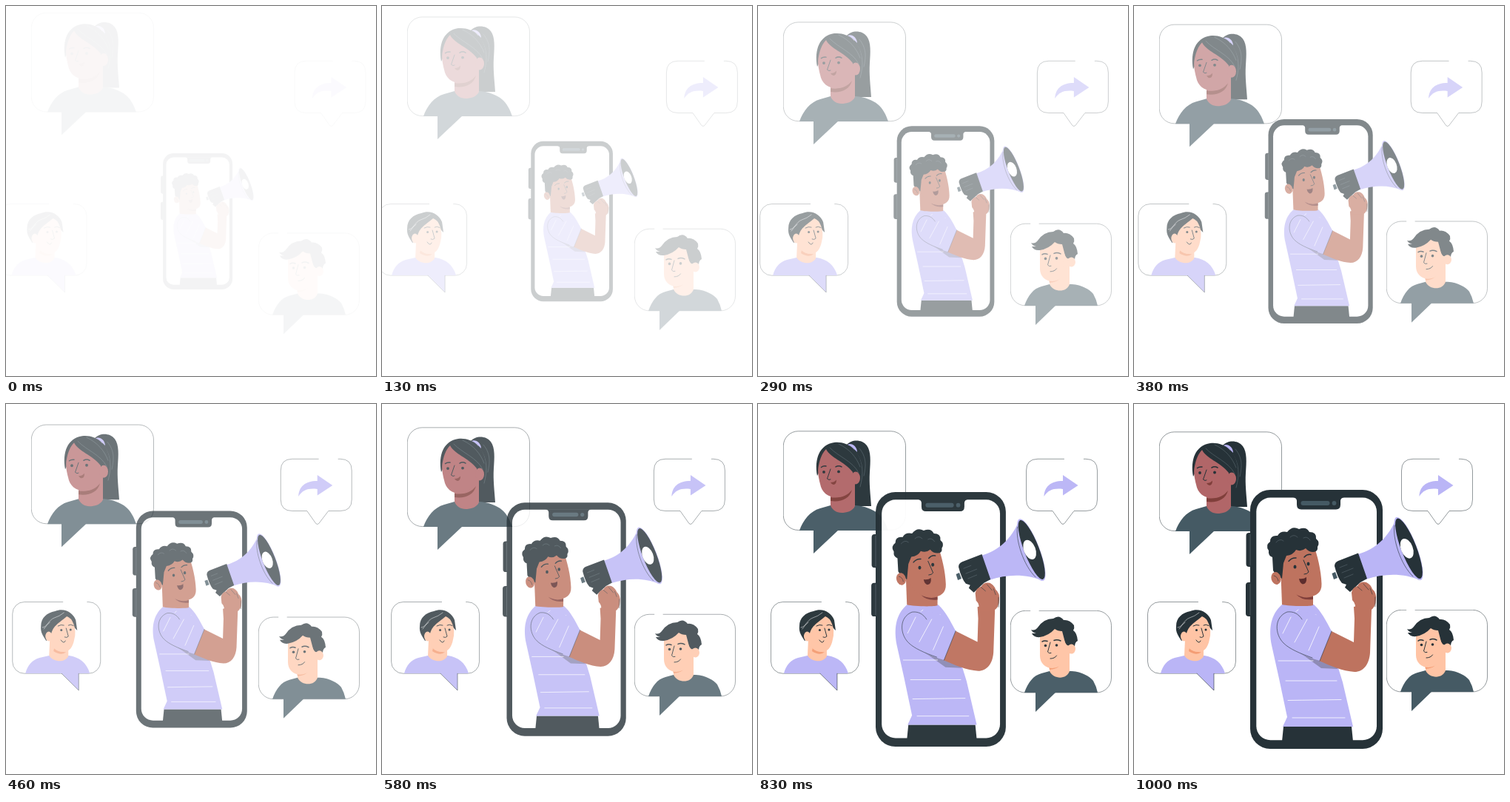
These frames come from a looping animation (500x500 px, 1.04 s). An HTML page:

```html
<!DOCTYPE html>
<html lang="en">
<head>
<meta charset="utf-8">
<title>Announcement</title>
<style>
  html, body { margin: 0; width: 100%; height: 100%; overflow: hidden; background: #fff; }
  svg { display: block; width: 100vw; height: 100vh; }
  .dark { fill: #263238; }
  .slate { fill: #455a64; }
  .lilac { fill: #bab5f6; }
  .brown { fill: #be735f; }
  .rose { fill: #b16668; }
  .peach { fill: #ffc4a5; }
  .white { fill: #fff; }
  .shade { fill: #803f3b; }
  .orange { fill: #f49d74; }
  .box { fill: #fff; stroke: #263238; stroke-width: .5; }
  .ink, .stripe, .strand { fill: none; stroke-linecap: round; stroke-linejoin: round; }
  .ink { stroke: #263238; stroke-width: 1; }
  .brow { stroke-width: 1.5; }
  .thin { stroke-width: .6; }
  .stripe { stroke: #fff; stroke-width: .8; }
  .strand { stroke: #65747b; stroke-width: .5; }
</style>
</head>
<body>
<svg viewBox="0 0 500 500" xmlns="http://www.w3.org/2000/svg">

  <g id="woman">
    <rect class="box" x="34.3" y="37.800" width="165.2" height="133.7" rx="20"/>
    <path class="dark" d="M120 56C126 49 140 48 147 57C153 65 152 79 151 93C150 109 152 123 153 139H131L130 62Z"/>
    <path class="strand" d="M137 61C147 73 146 85 143 98M133 67C142 80 143 95 138 113"/>
    <path class="slate" d="M56 172C61 158 70 146 84 142L98 138H132C144 139 155 143 162 149C169 155 173 163 176 172H108L75 203V172Z"/>
    <path class="rose" d="M98 118L131 105V139C128 146 119 148 113 148C106 148 100 144 98 138Z"/>
    <path class="shade" d="M98 127C111 129 121 125 127 117C124 129 112 134 98 132Z"/>
    <path class="dark" d="M80 98C76 75 83 56 103 53C122 51 136 64 139 80C142 93 139 105 133 109L122 104L90 78Z"/>
    <path class="rose" d="M82 84C84 74 87 67 92 62C98 74 116 78 128 93V109C125 121 116 127 106 127C94 127 86 120 84 109C82 101 80 92 82 84Z"/>
    <ellipse class="rose" cx="132" cy="101" rx="6" ry="8.500"/>
    <path class="strand" d="M97 60C108 72 128 78 136 94M109 55C124 62 133 73 138 86"/>
    <path class="lilac" d="M121 56C126 53 134 58 134 66C130 62 126 58 121 56Z"/>
    <circle class="dark" cx="89" cy="93" r="1.900"/>
    <circle class="dark" cx="109" cy="92.500" r="1.900"/>
    <path class="ink brow" d="M85.500 86.500Q88 84.500 92 85M105 86Q109 83.500 113 86"/>
    <path class="ink" d="M98 89L93.500 102Q96 104.500 98 103"/>
    <path class="shade" d="M98 107Q103 107 106 103.500Q106 110 102 110Q100 110 98 107Z"/>
  </g>

  <g id="share">
    <path class="box" pathLength="100" stroke-dasharray="11 8 200" d="M377 74.300H442Q457.500 74.300 457.500 90V129Q457.500 144.500 442 144.500H426L413 161.500Q411 163.500 409 161.500L397 144.500H377Q361.500 144.500 361.500 129V90Q361.500 74.300 377 74.300Z"/>
    <path class="lilac" d="M385.500 125C386 112 394 104 411 104V96L431.500 110L411 123.500V115C399 113.500 391 116 385.500 125Z"/>
  </g>

  <g id="boy">
    <rect class="box" pathLength="100" stroke-dasharray="13 8 200" x="18.500" y="267.500" width="119" height="96.700" rx="16"/>
    <path class="lilac" d="M36 364C39 353 45 346 55 343L68 340H95C109 342 119 350 123 364H108V387L85 364Z"/>
    <path class="ink thin" d="M85 364.300L108 387V364.300"/>
    <path class="peach" d="M69 318H94V341C89 350 74 349 68 340Z"/>
    <path class="orange" d="M75 329Q81 336 91 335Q85 341 74 334Z"/>
    <path class="dark" d="M64 320C60 313 56 309 57 300C57 289 65 282 76 280C89 275 100 282 104 292L106 306L94 294L74 313Z"/>
    <path class="peach" d="M70 315C72 300 80 297 92 287Q98 289 101 297Q105 307 102 318C100 329 95 335 87 335C77 335 70 328 69 318Z"/>
    <ellipse class="peach" cx="67.500" cy="314" rx="4.500" ry="6.500"/>
    <path class="strand" style="stroke:#fff" d="M59 302C65 302 67 292 75 289Q82 287 88 282M61 304Q65 298 69 295"/>
    <circle class="dark" cx="84.500" cy="305.500" r="1.500"/>
    <circle class="dark" cx="97" cy="305" r="1.500"/>
    <path class="ink" d="M80 300Q84 297.500 88 299M94 299Q97 297 101 299.500"/>
    <path class="ink" d="M91 303L94 314Q92 316.500 89 315M84 319Q88 325 90 320"/>
  </g>

  <g id="friend">
    <rect class="box" pathLength="100" stroke-dasharray="1.500 2.500 200" x="341.300" y="278.300" width="136.200" height="110.700" rx="20"/>
    <path class="slate" d="M360 389C365 375 372 366 383 363L394 360H424C438 361 448 367 453 373Q457 380 459 389H402L375 415V389Z"/>
    <path class="peach" d="M394 340L421 328V360C417 372 399 371 394 360Z"/>
    <path class="orange" d="M393 354Q404 353 411 345Q409 357 394 358Z"/>
    <path class="peach" d="M381 309L390 298H416L420 331C418 346 411 355 398 356C388 356 381 349 381 339Z"/>
    <path class="dark" d="M369 304Q374 306 378 301Q386 289 399 289Q407 283 413 291Q421 290 427 298Q428 302 426 305Q431 308 432 319Q428 321 428 327L416 325L411 306Q405 306 401 303Q393 312 381 314Q373 315 370 309L376 309Q371 308 369 304Z"/>
    <ellipse class="peach" cx="423.500" cy="330" rx="5.500" ry="6.500"/>
    <path class="peach" d="M414 319Q417 326 420 326V337H412Z"/>
    <circle class="dark" cx="388.500" cy="325.500" r="1.800"/>
    <circle class="dark" cx="403.500" cy="325" r="1.800"/>
    <path class="ink brow" d="M384 320Q387 318 391 319.500M400 318.500Q404 316.500 409 319"/>
    <path class="ink" d="M395 321L391.500 334Q393 336.500 396 335.500M395 343Q401 343 403.500 339"/>
  </g>

  <g id="phone">
    <g class="dark">
      <rect x="151.500" y="174" width="10" height="46" rx="4"/>
      <rect x="151" y="241" width="10" height="46" rx="4"/>
      <rect x="157" y="116" width="179" height="350" rx="27"/>
    </g>
    <path class="ink thin" style="stroke:#65747b" d="M157 176V218M157 243V285"/>
    <rect class="white" x="165.300" y="126.500" width="162.700" height="327.700" rx="19"/>
    <path class="dark" d="M215 126H284Q279 127 279 131V136Q279 142.500 273 142.500H226Q220 142.500 220 136V131Q220 127 215 126Z"/>
    <rect class="slate" x="225.500" y="131" width="39" height="6" rx="3"/>
    <circle class="slate" cx="270.500" cy="134" r="2.900"/>

    <path class="dark" d="M202 436H294L296 456H200Z"/>
    <path class="lilac" d="M200 271H243C253 280 259 292 267 307L274 350L282 376L296 436H201L207 423L196 371L186 326C182 305 184 285 200 271Z"/>
    <path style="fill:#8e8bb5" d="M207 326L251 344L273 353L275 358L253 357L231 341Z"/>
    <path class="stripe" d="M195 347H242M205 374H274M208 400.500L280 399.500M214 424H285M216 283L222 278M233 285H246"/>

    <path class="brown" d="M267 307L297 322L298 290L297 274L319 270L321 278L319 336C318 352 310 362 298 362C282 361 266 354 250 347Z"/>
    <path class="lilac" d="M207 281C226 280 242 279 251 289L267 307L251 347C231 341 214 333 202 323C190 311 189 288 207 281Z"/>
    <path class="ink thin" d="M241 343C224 337 210 331 202 323C190 311 189 288 207 281C215 280 222 283 227 291M251 347L267 307"/>
    <path class="stripe" d="M201 310L212 288M217 322L234 291M236 333L250 301"/>

    <path class="brown" d="M198 218H242V272C236 274 207 273 200 271Z"/>
    <path class="shade" d="M219 257Q230 264 242 260V264Q227 266 219 257Z"/>
    <path class="brown" d="M200 188H242C248 205 253 225 253.500 243C254 255 246 260 235 260.500C220 261 207 252 202 238Z"/>
    <path class="dark" d="M200 236Q191 231 188 225L187 207Q181 205 182 198Q177 191 184 186Q184 177 194 178Q198 171 207 173Q214 164 223 169Q233 165 237 173Q247 173 246 182Q252 187 248 193Q249 200 242 200Q236 200 232 195Q226 200 219 197Q215 204 206 205L202 215Z"/>
    <path class="strand" d="M192 187Q197 181 202 185M211 180Q216 175 221 180M229 181Q234 178 238 184"/>
    <ellipse class="brown" cx="192" cy="235.500" rx="6.500" ry="8.500" transform="rotate(-15 192 235.500)"/>
    <path class="ink thin" d="M189 232Q194 233 195 239"/>
    <ellipse class="dark" cx="217.500" cy="220" rx="2" ry="2.500"/>
    <ellipse class="dark" cx="235.500" cy="216" rx="2" ry="2.500"/>
    <path class="ink brow" d="M209 212.500Q213 207.500 219 208M230 207Q234 202.500 239 203.500"/>
    <path class="ink" d="M229 211L236 227Q234 230 230 230"/>
    <path d="M223 236Q229 237 233 234Q234 243 228 243.500Q224 242 223 236Z" style="fill:#5c2d2d"/>

    <path class="lilac" d="M303 203C326 196 344 181 355 153L386 238C366 229 340 228 313 237Z"/>
    <g transform="translate(371 195.500) rotate(68.800)">
      <ellipse class="lilac" rx="45.500" ry="11.300"/>
      <ellipse class="dark" cy="-.5" rx="43.500" ry="10.300"/>
      <ellipse class="white" cx="-1" cy="2" rx="14" ry="8"/>
    </g>
    <path class="ink thin" d="M352 164C349 181 360 217 377 233"/>
    <path class="dark" d="M271 219Q271 214 276 212L303 201.500L315 236L306 241L292 254L285 248L287 244L281 242Q275 235 271 219Z"/>
    <path class="slate" d="M267.500 229L272 227L275 235L270 237Z"/>
    <path class="strand" d="M278 221L288 217M281 228L296 222M284 235L296 230"/>
    <path class="brown" d="M294 255Q295 248 302 246Q306 239 314 241Q320 244 322 250Q328 255 327 264Q327 275 319 279H298Q301 271 295 265Z"/>
    <path class="ink thin" d="M302 247L308 252M310 243L317 251M319 249L322 257M326 261V274"/>
  </g>
</svg>

<script>
  const LOOP = 1040, STEPS = 25, RATE = 24, LEAD = 0.8;
  const ORIGIN = { x: 273, y: 291 };
  const SLIDE = 30;
  const directions = { woman: [0, -1], share: [1, 0], boy: [-1, 0], friend: [0, 1] };

  function place(id, transform, opacity) {
    const part = document.getElementById(id);
    part.setAttribute('transform', transform);
    part.setAttribute('opacity', opacity);
  }

  // The picture advances at 24 steps a second, on a 10 ms clock.
  function stepAt(ms) {
    const clock = Math.floor((ms % LOOP) / 10) * 10;
    return Math.min(STEPS - 1, Math.floor((clock + 4.9) * RATE / 1000));
  }

  function draw(ms) {
    const eased = Math.sin((stepAt(ms) + LEAD) / STEPS * Math.PI / 2);
    const offset = SLIDE * (1 - eased);
    for (const [id, [dx, dy]] of Object.entries(directions)) {
      place(id, `translate(${dx * offset} ${dy * offset})`, eased);
    }
    const { x, y } = ORIGIN;
    const scale = 0.5 + 0.5 * eased;
    place('phone', `translate(${x} ${y}) scale(${scale}) translate(${-x} ${-y})`, eased);
  }

  const start = performance.now();
  function tick() {
    draw(performance.now() - start);
    requestAnimationFrame(tick);
  }
  draw(0);
  requestAnimationFrame(tick);
</script>
</body>
</html>
```
